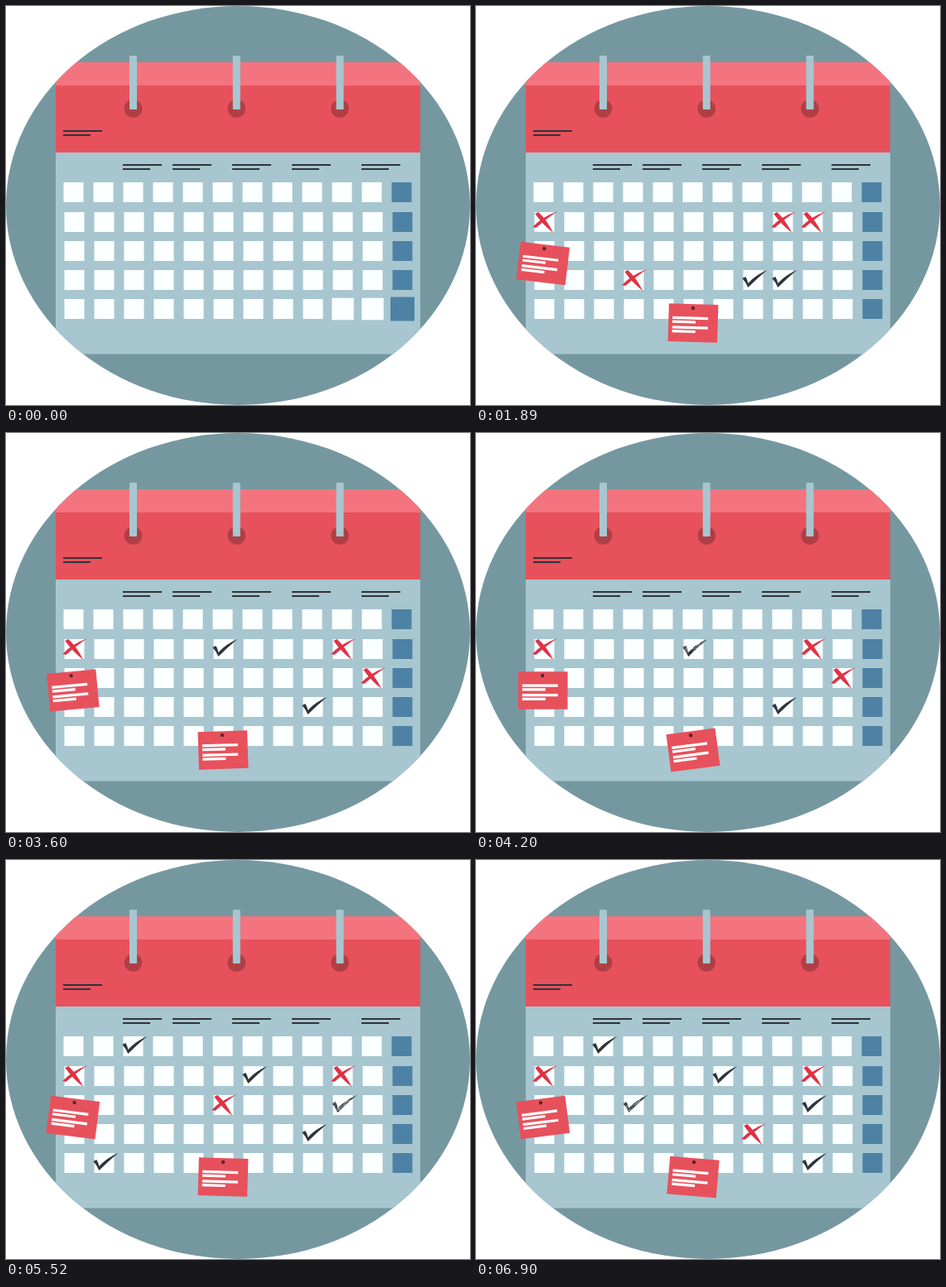
An HTML page with a canvas that plays this animation: 560x482 px, repeating every 6.93 s.

```html
<!DOCTYPE html>
<html lang="en">
<head>
<meta charset="utf-8">
<title>Calendar</title>
<style>
  html, body { margin: 0; width: 100%; height: 100%; overflow: hidden; background: #fff; }
  canvas { display: block; }
</style>
</head>
<body>
<canvas id="stage" width="560" height="482"></canvas>
<script>
const ctx = document.getElementById('stage').getContext('2d');
const LOOP = 6930, FADE = 300;
const RED = '#e7515c', PALE = '#a7c6d0', INK = '#303439';
const CELL = 24, COLS = 12, ROWS = 5;

const crossShape = new Path2D(
  'M-12 -9 L-8 -11 Q2 -2 10 14 Q-2 5 -12 -9Z M15 -12 Q3 -4 -11 8 L-15 7 Q-4 -5 15 -12Z');
const tickShape = new Path2D(
  'M-14 -1 L-10 -3 Q-8 0 -7 5 Q2 -5 16 -11 Q4 -1 -7 10 Q-10 3 -14 -1Z');

const cross = (col, row, end) => ({ shape: crossShape, color: '#e03243', col, row, end });
const tick = (col, row, end) => ({ shape: tickShape, color: INK, col, row, end });

// Marks come in waves, one after another within a wave.
const wave = (start, step, ...marks) =>
  marks.map((mark, i) => ({ ...mark, start: start + i * step }));

const marks = [
  ...wave(620, 110, cross(0, 1), tick(7, 3, 3100), cross(3, 3, 2000),
    cross(8, 1, 2000), cross(9, 1), tick(8, 3, 6200)),
  ...wave(1900, 200, tick(5, 1, 4200), cross(10, 2, 5200)),
  ...wave(4480, 190, tick(1, 4, 6200), cross(5, 2, 6100), tick(2, 0), tick(6, 1), tick(9, 2)),
  ...wave(6250, 180, cross(7, 3), tick(9, 4), tick(3, 2))
];

const notes = [
  { x: 80.8, y: 311, start: 350, peak: 1700 },
  { x: 262, y: 383, start: 1090, peak: 2850 }
];

const clamp = v => Math.max(0, Math.min(1, v));
const ease = u => (1 - Math.cos(Math.PI * u)) / 2;
const cellX = (col, row) => (row ? 70.5 : 69.5) + col * 36;
const cellY = row => Math.round(213.4 + row * 35.1);

function rect(x, y, w, h, color) {
  ctx.fillStyle = color;
  ctx.fillRect(x, y, w, h);
}

function disc(x, y, r, color) {
  ctx.fillStyle = color;
  ctx.beginPath();
  ctx.arc(x, y, r, 0, 7);
  ctx.fill();
}

function random(seed) {
  return () => (seed = seed * 16807 % 2147483647) / 2147483647;
}

// Quick fall, slow rise; the swing builds up after the note appears.
function swing(t, { start, peak }) {
  const fall = 1300, rise = 2400, period = fall + rise;
  const u = (t - peak + period) % period;
  const height = u < fall ? 1 - ease(u / fall) : ease((u - fall) / rise);
  return 7.5 * (2 * height - 1) * clamp((t - start) / 1100);
}

function label(x, y) {
  rect(x, y, 47, 2, INK);
  rect(x, y + 5, 33, 2, INK);
}

function drawCells(t) {
  for (let row = 0; row < ROWS; row++) {
    for (let col = 0; col < COLS; col++) {
      const blue = col === COLS - 1;
      const settling = row === ROWS - 1 && col >= COLS - 3;
      const extra = settling ? (blue ? 5 : 2.5) * clamp(1 - t / 120) : 0;
      const size = CELL + extra;
      rect(cellX(col, row) - extra / 2, cellY(row) - extra / 2, size, size,
        blue ? '#4e82a4' : '#fbffff');
    }
  }
}

function drawCalendar(t) {
  rect(0, 0, 560, 482, '#fff');
  ctx.save();
  ctx.beginPath();
  ctx.ellipse(280, 241, 280, 241, 0, 0, 7);
  ctx.clip();
  rect(0, 0, 560, 482, '#7598a0');
  rect(60, 68, 440, 352.5, PALE);
  rect(60, 68, 440, 28, '#f3747f');
  rect(60, 96, 440, 81, RED);
  ctx.restore();
  for (let i = 0; i < 3; i++) {
    const x = 153.5 + i * 124.75;
    disc(x, 124, 10.8, '#b03f45');
    ctx.fillStyle = PALE;
    ctx.beginPath();
    ctx.roundRect(x - 4.5, 60, 9, 65, 1);
    ctx.fill();
  }
  label(69, 150);
  [141, 201, 273, 345, 429].forEach(x => label(x, 191));
  drawCells(t);
}

// A mark is scribbled in and out with short strokes inside its outline.
function drawMark({ shape, color, col, row, start, end = Infinity }, t) {
  const p = Math.min(clamp((t - start) / FADE), clamp(1 - (t - end) / FADE));
  if (!p) return;
  ctx.save();
  ctx.translate(cellX(col, row) + CELL / 2 + .8, cellY(row) + CELL / 2 - 1);
  ctx.fillStyle = ctx.strokeStyle = color;
  ctx.globalAlpha = p < 1 ? p * .6 : 1;
  ctx.fill(shape);
  if (p < 1) {
    const rnd = random(col * 97 + row + 1);
    ctx.clip(shape);
    ctx.globalAlpha = 1;
    ctx.beginPath();
    for (let i = 0; i < 240 * p; i++) {
      const x = rnd() * 32 - 16, y = rnd() * 28 - 14;
      ctx.moveTo(x, y);
      ctx.lineTo(x + 2 + rnd() * 2, y - 2);
    }
    ctx.stroke();
  }
  ctx.restore();
}

function drawNote(note, t) {
  const p = clamp((t - note.start) / 400);
  if (!p) return;
  const scale = .7 + .3 * p;
  ctx.save();
  ctx.translate(note.x, note.y);
  ctx.rotate(swing(t, note) * Math.PI / 180);
  ctx.scale(scale, scale);
  ctx.globalAlpha = clamp(p * 3);
  if (p < 1) ctx.filter = `blur(${(2.5 * (1 - p)).toFixed(2)}px)`;
  rect(-29.8, -22.8, 59.6, 45.6, RED);
  ctx.filter = 'none';
  disc(-.5, -18, 2.2 * p, '#57272b');
  ctx.globalAlpha = clamp(p * 2.5 - 1.5);
  for (const top of [-7.5, 4]) {
    rect(-25, top, 43, 3.2, '#fff');
    rect(-25, top + 4.8, 28, 3.2, '#fff');
  }
  ctx.restore();
}

function frame(now) {
  const t = now % LOOP;
  drawCalendar(t);
  marks.forEach(mark => drawMark(mark, t));
  notes.forEach(note => drawNote(note, t));
  requestAnimationFrame(frame);
}
requestAnimationFrame(frame);
</script>
</body>
</html>
```
